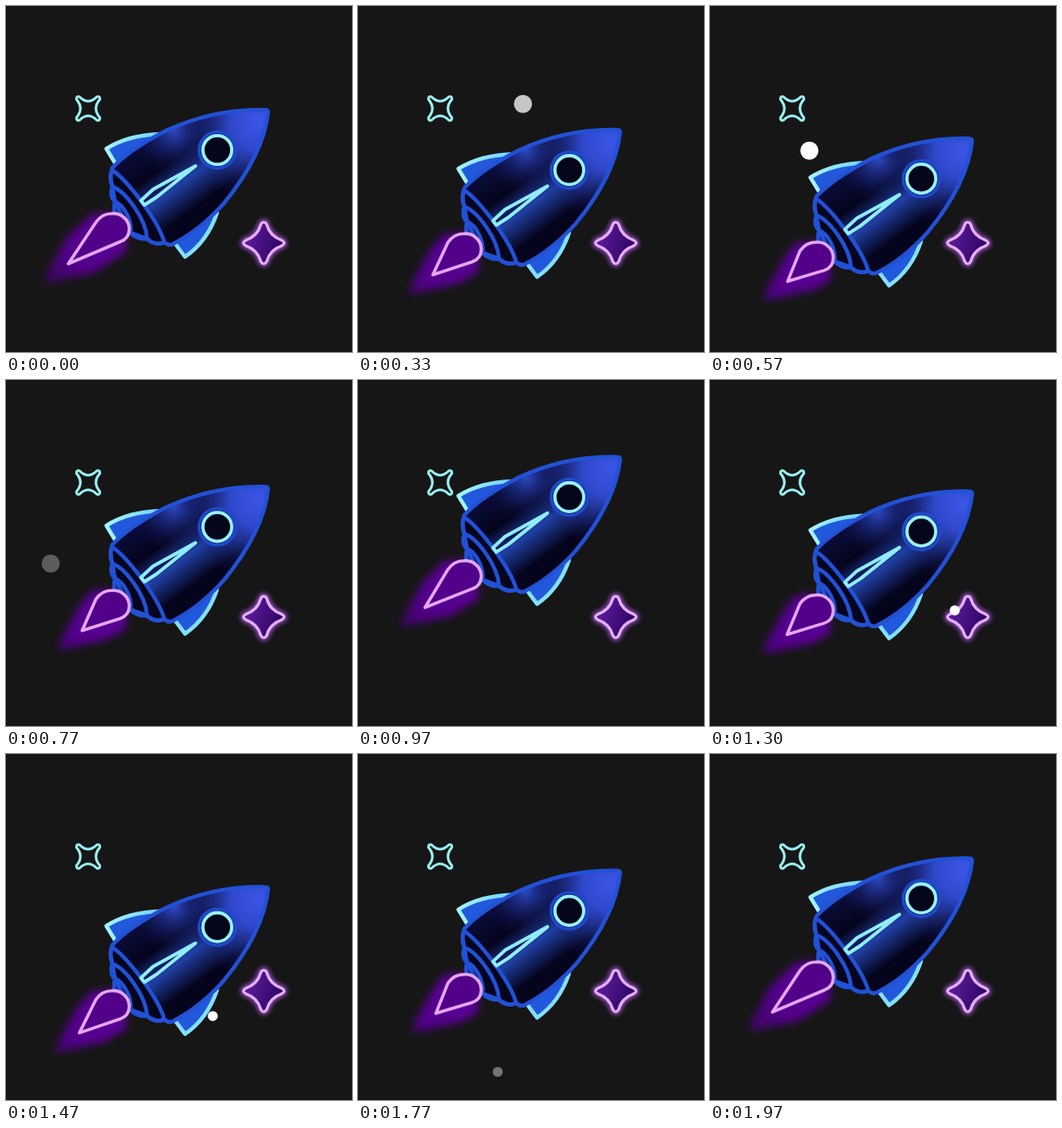
An HTML page for the animation above (2010 ms loop, 400 by 400 pixels).

```html
<!DOCTYPE html>
<html lang="en">
<head>
<meta charset="utf-8">
<title>Neon rocket</title>
<style>
html, body { margin: 0; height: 100%; overflow: hidden; background: #161616; }
svg { display: block; width: 100vw; height: 100vh; }
path, circle { stroke-linejoin: round; stroke-linecap: round; }
</style>
</head>
<body>
<svg viewBox="0 0 400 400" fill="none">
  <defs>
    <filter id="soft" x="-50%" y="-50%" width="200%" height="200%"><feGaussianBlur stdDeviation="5"/></filter>
    <filter id="halo" x="-50%" y="-50%" width="200%" height="200%"><feGaussianBlur stdDeviation="2.6"/></filter>
    <radialGradient id="nose" gradientUnits="userSpaceOnUse" cx="292" cy="134" r="92">
      <stop offset="0" stop-color="#3b56e6"/><stop offset=".35" stop-color="#2f48cc"/>
      <stop offset="1" stop-color="#16206c" stop-opacity="0"/>
    </radialGradient>
    <radialGradient id="back" gradientUnits="userSpaceOnUse" cx="194" cy="144" r="50">
      <stop offset="0" stop-color="#2c48c0"/><stop offset="1" stop-color="#10145c" stop-opacity="0"/>
    </radialGradient>
    <linearGradient id="band" gradientUnits="userSpaceOnUse" x1="154" y1="164" x2="222" y2="256">
      <stop offset="0" stop-color="#0a0c38"/><stop offset=".3" stop-color="#05041d"/>
      <stop offset=".54" stop-color="#2040a4"/><stop offset=".82" stop-color="#05041d"/>
    </linearGradient>
    <linearGradient id="fin" gradientUnits="userSpaceOnUse" x1="115" y1="165" x2="178" y2="148">
      <stop offset="0" stop-color="#a4f4ff"/><stop offset="1" stop-color="#74d4fa"/>
    </linearGradient>
    <linearGradient id="fire" gradientUnits="userSpaceOnUse" x1="128" y1="254" x2="44" y2="318">
      <stop offset="0" stop-color="#5c0098"/><stop offset=".6" stop-color="#52008a"/>
      <stop offset="1" stop-color="#480078" stop-opacity=".7"/>
    </linearGradient>
    <linearGradient id="gem" gradientUnits="userSpaceOnUse" x1="280" y1="268" x2="314" y2="278">
      <stop offset="0" stop-color="#5a1a98"/><stop offset="1" stop-color="#320668"/>
    </linearGradient>
    <path id="hull" d="M303 123C303 121 302 120 299 120C262 119 222 127 185 144C160 157 138 171 123 187C120 194 121 202 123 209C120 216 122 223 126 226C122 240 130 256 144 262C149 268 157 270 163 269C169 275 177 276 183 273C187 277 191 277 195 274C216 263 236 246 252 228C278 196 299 160 303 123Z"/>
    <path id="spark" d="M298 250Q300.500 250 301.500 253Q305 266 319 271Q324 274 319 277Q305 282 301.500 295Q298 301 294.500 295Q291 282 277 277Q272 274 277 271Q291 266 294.500 253Q295.500 250 298 250Z"/>
  </defs>

  <path stroke="#9aeef0" stroke-width="3" d="M85 105Q95 115 105 105Q109 104 108.500 108Q99.500 118.500 108.500 129Q109 133 105 132Q95 122 85 132Q81 133 81.500 129Q90.500 118.500 81.500 108Q81 104 85 105Z"/>
  <use href="#spark" stroke="#b458ea" stroke-width="7" opacity=".8" filter="url(#halo)"/>
  <use href="#spark" fill="url(#gem)" stroke="#e6b0f8" stroke-width="3.200"/>

  <g id="rocket">
    <path id="glow" fill="url(#fire)" filter="url(#soft)"/>
    <g fill="#2259dc" stroke="url(#fin)" stroke-width="4.500">
      <path d="M127 183L116 165Q141 149 179 148L160 165Z"/>
      <path stroke="#84e0fc" d="M195 274L207 290Q233 272 244 239L225 250Z"/>
    </g>
    <use href="#hull" fill="url(#band)"/>
    <use href="#hull" fill="url(#back)"/>
    <use href="#hull" fill="url(#nose)"/>
    <g stroke="#2251d6" stroke-width="4.500">
      <path fill="#06051f" d="M123 209C120 202 120 194 123 190C140 201 176 248 183 273C177 276 169 275 163 269L144 262L126 226Z"/>
      <path d="M123 209C138 214 162 246 163 269"/>
      <path d="M126 226C136 230 146 248 144 262"/>
      <use href="#hull"/>
    </g>
    <path fill="#0e1c60" stroke="#90ecfd" stroke-width="4" d="M219 185L170 212L156 225L160 230L174 221Z"/>
    <circle cx="244.300" cy="166.500" r="21" fill="#0b1550" stroke="#1e49cc" stroke-width="3.500"/>
    <circle cx="244.300" cy="166.500" r="16.700" fill="#05061a" stroke="#98effb" stroke-width="3.800"/>
    <path id="flame" fill="#520089" stroke="#e5a6f4" stroke-width="3.600"/>
  </g>
  <circle id="big" r="10.500" fill="#fff"/>
  <circle id="small" r="5.800" fill="#fff"/>
</svg>
<script>
const LOOP = 2010;
const el = id => document.getElementById(id);
const clamp = v => Math.max(0, Math.min(1, v));

// Eased value between [time, value] keys
function track(keys, t) {
  const i = Math.max(1, keys.findIndex(k => t <= k[0]));
  const [t0, a] = keys[i - 1], [t1, b] = keys[i];
  return a + (b - a) * (1 - Math.cos(Math.PI * (t - t0) / (t1 - t0))) / 2;
}

const bob = [[0, 0], [535, 34], [1038, -34], [1490, 34], [LOOP, 0]];
// How far the flame is drawn in: 0 long, 1 short
const pull = [[0, 0], [270, .9], [400, .7], [550, 1], [690, .75], [790, .9], [980, .3],
  [1200, .9], [1410, 1], [1570, .1], [1770, 1], [1980, 0], [LOOP, 0]];

function flame(p) {
  const x = 72 + 18 * p, y = 298 - 13 * p;
  el("flame").setAttribute("d",
    `M${x} ${y}L104 250C109 243 115 240 122 240C134 239 142.500 248 142.500 258
     C142.500 265 139 270 132 272.500Z`);
  el("glow").setAttribute("d",
    `M100 240L138 239L139 284L${x + 30} ${y + 10}L${x - 28} ${y + 23}L${x - 24} ${y + 9}L${x - 2} ${y - 30}Z`);
}

function dot(id, t, [x, y, vx, vy], [start, full, fade, end]) {
  const c = el(id), dt = t - start;
  c.setAttribute("cx", x + vx * dt);
  c.setAttribute("cy", y + vy * dt);
  c.setAttribute("opacity", clamp(Math.min(dt / (full - start), (end - t) / (end - fade))));
}

function draw(now) {
  const t = now % LOOP;
  el("rocket").setAttribute("transform", `translate(0 ${track(bob, t)})`);
  flame(track(pull, t));
  dot("big", t, [289, 43.250, -.316, .225], [20, 430, 660, 820]);
  dot("small", t, [346.500, 213.500, -.2583, .2150], [1055, 1300, 1690, 1825]);
  requestAnimationFrame(draw);
}
draw(0);
</script>
</body>
</html>
```
